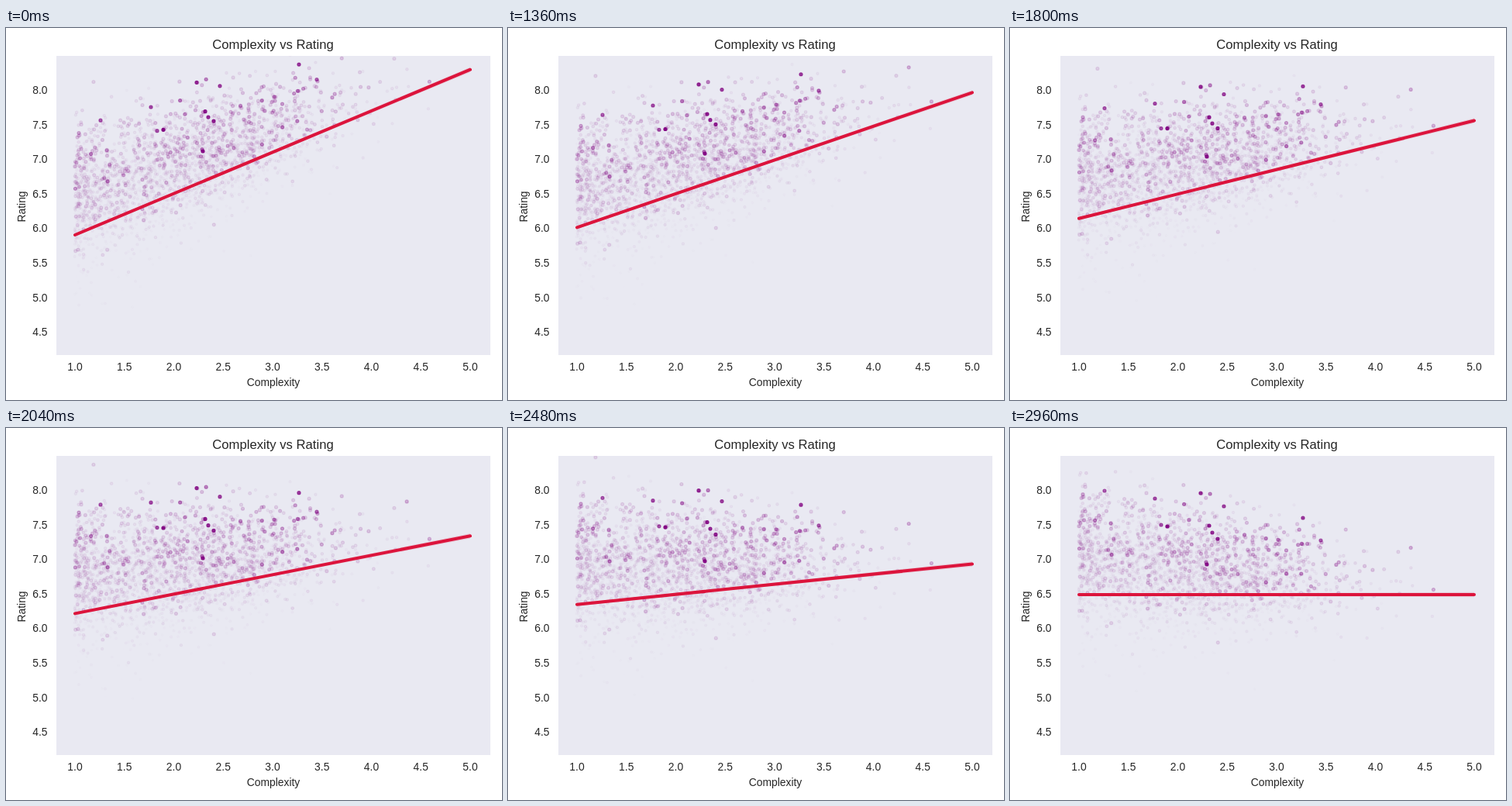
Recreate the animation shown at these times as an HTML page. Size 640 px wide and 480 px high, loop 5 s.

```html
<!DOCTYPE html>
<html lang="en">
<head>
<meta charset="utf-8">
<title>Complexity vs Rating</title>
<style>
html, body { margin: 0; width: 100%; height: 100%; overflow: hidden; background: #fff; }
svg { display: block; width: 100vw; height: 100vh; }
text { font-family: Arial, "Liberation Sans", sans-serif; font-size: 13.89px; fill: #262626; }
</style>
</head>
<body>
<svg id="chart" viewBox="0 0 640 480">
  <clipPath id="area"><rect x="65" y="36" width="560" height="386"/></clipPath>
  <rect width="640" height="480" fill="#fff"/>
  <rect x="65" y="36" width="560" height="386" fill="#e9e9f2"/>
  <g id="dots" clip-path="url(#area)"></g>
  <path id="band" fill="#dc143c" fill-opacity=".15"/>
  <path id="fit" fill="none" stroke="#dc143c" stroke-width="4" stroke-linecap="round"/>
  <g id="labels"></g>
</svg>
<script>
const LOOP = 5000, START = 1000, STEP = 40, LAST = 49;
const PIVOT = 213.3, TILT = 0.4182, MEAN = 215, LEFT = 89, RIGHT = 599;
const $ = id => document.getElementById(id);

function add(parent, tag, attrs, text) {
  const el = document.createElementNS('http://www.w3.org/2000/svg', tag);
  for (const k in attrs) el.setAttribute(k, attrs[k]);
  if (text) el.textContent = text;
  parent.appendChild(el);
  return el;
}

// Axis labels
const label = (text, x, y, more) =>
  add($('labels'), 'text', { x, y, 'text-anchor': 'middle', ...more }, text);
label('Complexity vs Rating', 344.5, 27, { style: 'font-size:16.67px' });
label('Complexity', 345, 462);
label('Rating', 0, 0, { transform: 'translate(25 230.5) rotate(-90)' });
for (let i = 0; i < 9; i++) label((1 + i / 2).toFixed(1), LEFT + 63.75 * i, 442);
for (let i = 0; i < 8; i++)
  label((8 - i / 2).toFixed(1), 53.5, Math.round(85 + 44.6 * i), { 'text-anchor': 'end' });

// Seeded random numbers
let seed = 20417;
function rnd() {
  seed = (seed + 0x6D2B79F5) | 0;
  let t = Math.imul(seed ^ (seed >>> 15), 1 | seed);
  t = (t + Math.imul(t ^ (t >>> 7), 61 | t)) ^ t;
  return ((t ^ (t >>> 14)) >>> 0) / 4294967296;
}
const gauss = () => Math.sqrt(-2 * Math.log(1 - rnd())) * Math.cos(2 * Math.PI * rnd());

function randomX() {
  if (rnd() < 0.13) return 88.5 - 22 * Math.log(1 - rnd());
  let x;
  do x = 222 + 104 * gauss(); while (x < 88 || x > 570);
  return x;
}

// Higher ratings and heavier games tend to be more popular, hence more opaque
function randomPoint() {
  const x = randomX(), dx = x - PIVOT;
  let q = gauss();
  if (rnd() < 0.06) q = -1.7 * Math.abs(q);
  const y = 182 + 0.09 * dx - q * (38 - 0.035 * dx);
  const a = 0.034 * Math.exp(0.45 * Math.min(q, 1.5) + 0.0015 * dx + 0.78 * gauss());
  return { x, y, a: Math.min(a, 0.45) };
}

// Points are stored at their levelled position
const points = Array.from({ length: 2800 }, randomPoint).sort((p, q) => p.a - q.a);

// The most popular items, strongest first
[
  [203, 127], [254, 176], [257, 126], [268, 143], [261, 135], [246, 84], [378, 116],
  [276, 101], [187, 91], [195, 125], [122, 81], [401, 145]
].forEach(([x, y], i) => points.push({ x, y, a: 0.95 - 0.035 * i }));

for (const p of points) {
  const color = `rgba(128,0,128,${p.a.toFixed(3)})`;
  p.el = add($('dots'), 'circle', {
    cx: p.x.toFixed(2), r: Math.min(2, 1.5 + 5 * p.a).toFixed(2),
    fill: color, stroke: color, 'stroke-width': 1.2
  });
}

function draw(step) {
  const k = TILT * (1 - step / LAST);
  const lift = x => (x - PIVOT) * k;
  const at = (x, d = 0) => `${x} ${(MEAN - lift(x) + d).toFixed(2)}`;
  for (const p of points) p.el.setAttribute('cy', (p.y - lift(p.x)).toFixed(2));
  $('fit').setAttribute('d', `M${at(LEFT)}L${at(RIGHT)}`);
  $('band').setAttribute('d',
    `M${at(LEFT, -2)}L${at(PIVOT, -1.5)}L${at(RIGHT, -3.2)}` +
    `L${at(RIGHT, 3.2)}L${at(PIVOT, 1.5)}L${at(LEFT, 2)}Z`);
}

let shown = -1;
function tick() {
  const t = performance.now() % LOOP;
  const step = Math.max(0, Math.min(LAST, Math.floor((t - START) / STEP)));
  if (step !== shown) draw(shown = step);
  requestAnimationFrame(tick);
}
tick();
</script>
</body>
</html>
```
